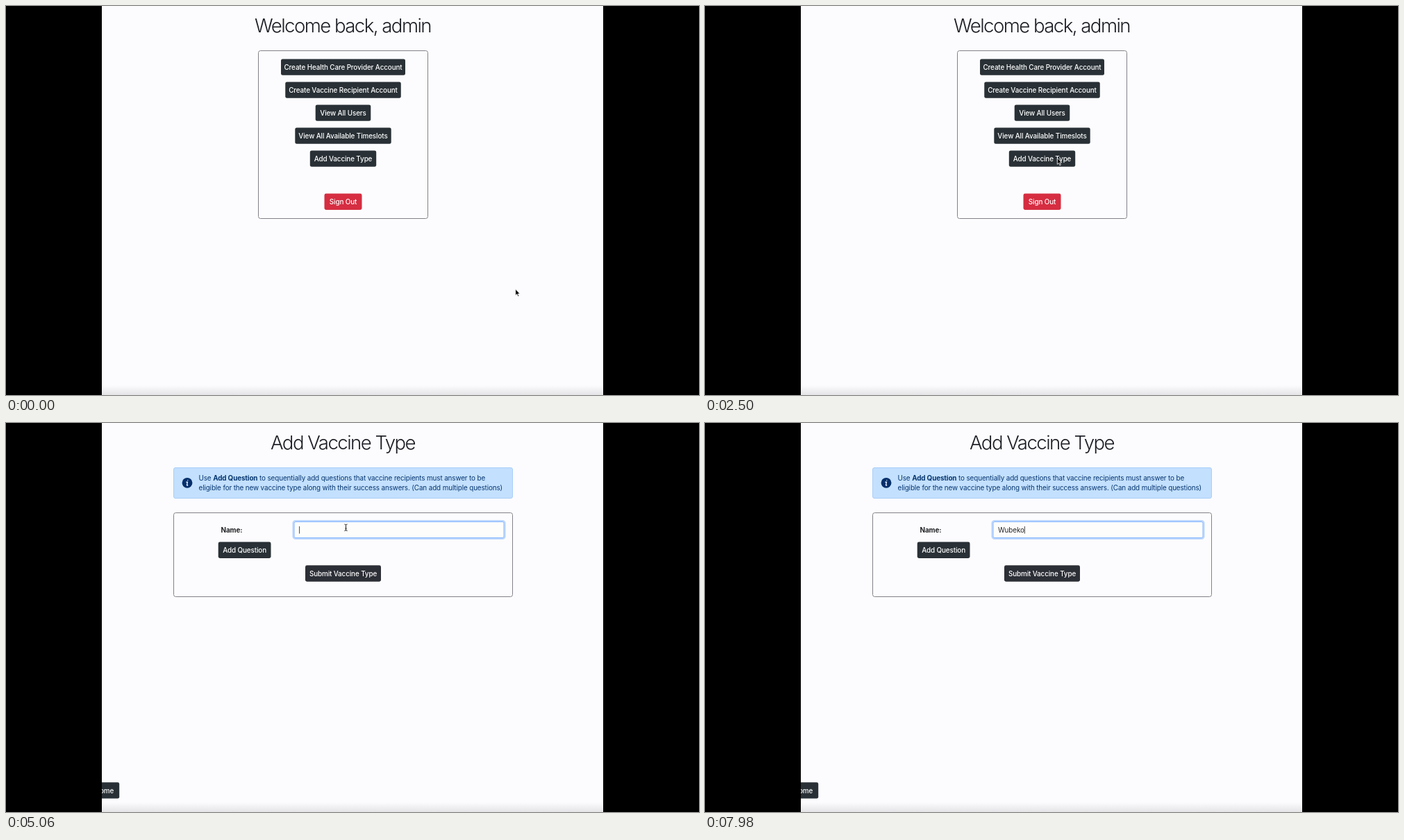
Write an HTML page that moves like this. It is 998 by 561 pixels and loops after 8 s.

```html
<!DOCTYPE html>
<html lang="en">
<head>
<meta charset="utf-8">
<title>Vaccine admin</title>
<style>
  html, body { margin: 0; width: 100%; height: 100%; overflow: hidden; background: #000; }
  svg { display: block; width: 100vw; height: 100vh; }
  text { font: 400 9.9px Inter, "Open Sans", sans-serif; letter-spacing: -.012em; fill: #222326; }
  .title { font-size: 27.6px; font-weight: 300; letter-spacing: -.056em; fill: #1d1f25; }
  .label { font-size: 9.9px; font-weight: 500; fill: #fff; }
  .bold { font-weight: 700; }
  .note { fill: #06366f; }
  .panel { fill: none; stroke: #828287; }
</style>
</head>
<body>
<svg viewBox="0 0 998 561">
  <defs>
    <linearGradient id="shade" x2="0" y2="1">
      <stop offset="0" stop-color="#fcfcfe"/>
      <stop offset="1" stop-color="#e4e4e7"/>
    </linearGradient>
    <clipPath id="page"><path d="M138 0H860V561H138Z"/></clipPath>
  </defs>
  <g clip-path="url(#page)">
    <rect x="138" width="722" height="561" fill="#fcfcfe"/>
    <rect x="138" y="547" width="722" height="14" fill="url(#shade)"/>

    <g id="menu">
      <text class="title" x="485" y="38" text-anchor="middle">Welcome back, admin</text>
      <rect class="panel" x="363.5" y="64.5" width="244" height="242" rx="3"/>
    </g>

    <g id="form">
      <text class="title" x="485" y="38" text-anchor="middle">Add Vaccine Type</text>
      <rect x="241.5" y="64.5" width="488" height="44" rx="2.5" fill="#c3e0fe" stroke="#a9cff8"/>
      <circle cx="261" cy="86.3" r="7.4" fill="#06306b"/>
      <path d="M261.7 82.6h.1M259.9 85.2h1.5l-.9 4.4q0 .7 1.2 .2" fill="none" stroke="#e4f0ff" stroke-width="1.4" stroke-linecap="round"/>
      <text class="note" x="277.5" y="82.6">Use <tspan class="bold">Add Question</tspan> to sequentially add questions that vaccine recipients must answer to be</text>
      <text class="note" x="277.5" y="97.2">eligible for the new vaccine type along with their success answers. (Can add multiple questions)</text>
      <rect class="panel" x="241.5" y="129.5" width="488" height="121" rx="3"/>
      <text class="bold" x="309.5" y="157.7">Name:</text>
      <rect id="ring" x="413.6" y="141.1" width="304.8" height="25.8" rx="3.5" fill="none" stroke="#bcd7fd" stroke-width="2.4"/>
      <rect id="field" x="415" y="142.5" width="302" height="23" rx="2" fill="#fdfdfc"/>
      <text id="typed" x="422" y="157.7"></text>
      <path id="caret" d="M0 149V159.5" stroke="#333" stroke-width=".9"/>
    </g>

    <path id="arrow" d="M0 0V9.3L2.1 7.4L3.6 10.8L5.1 10.1L3.6 6.9H6.5Z" fill="#0a0a0a" stroke="#fff" stroke-width=".8"/>
    <path id="beam" d="M-2-4.5Q0-4.5 0-3Q0-4.5 2-4.5M0-3V3.5M-2 5Q0 5 0 3.5Q0 5 2 5M-1.2 1.6H1.2" fill="none" stroke="#222"/>
  </g>
</svg>
<script>
const LOOP = 8000, PAGE_CHANGE = 2620, FOCUS = 4195, BLINK = 840;
const NAME = "Wubeko";
const KEY_TIMES = [6440, 6680, 6900, 7140, 7420, 7680];
// Pointer stops: time, x, y
const POINTER = [[250, 733.7, 408.2], [1500, 555.2, 206.8], [2100, 507.3, 219], [3180, 507.3, 219], [3860, 489.5, 150.5]];

const $ = id => document.getElementById(id);
const clamp = v => Math.max(0, Math.min(1, v));
const ease = v => v * v * (3 - 2 * v);
const show = (id, on) => $(id).setAttribute("visibility", on ? "inherit" : "hidden");

function addButton(parent, label, cx, y, width, color = "#293136") {
  parent.insertAdjacentHTML("beforeend",
    `<rect x="${cx - width / 2}" y="${y}" width="${width}" height="23.4" rx="2.4" fill="${color}"/>
     <text class="label" x="${cx}" y="${y + 15.3}" text-anchor="middle">${label}</text>`);
}

[["Create Health Care Provider Account", 179], ["Create Vaccine Recipient Account", 166.5], ["View All Users", 79.6],
 ["View All Available Timeslots", 138.4], ["Add Vaccine Type", 95.4]]
  .forEach(([label, width], i) => addButton($("menu"), label, 485.5, 76.4 + 33 * i, width));
addButton($("menu"), "Sign Out", 485.5, 270.6, 54, "#d62d41");
addButton($("form"), "Add Question", 343.6, 171.6, 75.8);
addButton($("form"), "Submit Vaccine Type", 485.5, 205.3, 109, "#2d2f37");
addButton($("form"), "Home", 141.4, 518.2, 43.6);

function pointerAt(t) {
  const next = POINTER.findIndex(p => p[0] > t);
  if (next === 0) return POINTER[0].slice(1);
  if (next < 0) return POINTER.at(-1).slice(1);
  const [a, b] = [POINTER[next - 1], POINTER[next]];
  const k = ease((t - a[0]) / (b[0] - a[0]));
  return [1, 2].map(i => a[i] + (b[i] - a[i]) * k);
}

function draw(t) {
  const onForm = t >= PAGE_CHANGE;
  show("menu", !onForm);
  show("form", onForm);

  const focus = clamp((t - FOCUS) / 130);
  $("ring").setAttribute("opacity", focus);
  $("field").style.stroke = `rgb(${212 - 78 * focus},${214 - 31 * focus},${227 + 27 * focus})`;

  const count = KEY_TIMES.filter(k => k <= t).length;
  $("typed").textContent = NAME.slice(0, count);
  const caretX = 422.6 + (count ? $("typed").getComputedTextLength() : 0);
  $("caret").setAttribute("transform", `translate(${caretX} 0)`);
  show("caret", onForm && t >= FOCUS && (count || (t - FOCUS) % BLINK < BLINK / 2));

  const [x, y] = pointerAt(t);
  const overField = onForm && y < 165;
  show("arrow", !overField);
  show("beam", overField && !count);
  for (const id of ["arrow", "beam"]) $(id).setAttribute("transform", `translate(${x} ${y})`);
}

function tick() {
  draw(performance.now() % LOOP);
  requestAnimationFrame(tick);
}
tick();
</script>
</body>
</html>
```
